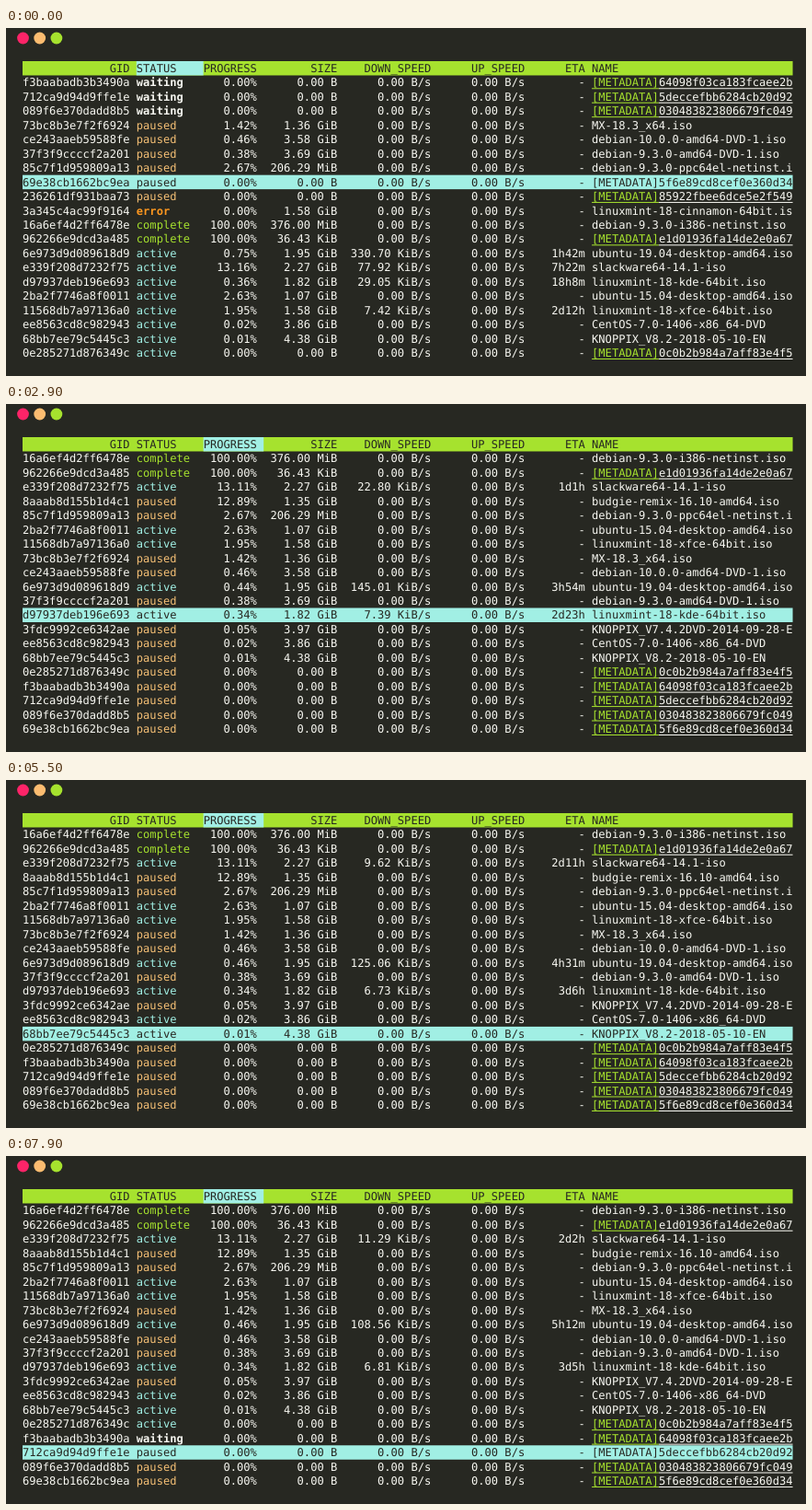
Animation of 870x378 px, one loop 8 s. Source, as an HTML page:

```html
<!DOCTYPE html>
<html lang="en">
<head>
<meta charset="utf-8">
<title>Download manager</title>
<style>
  html, body { margin: 0; width: 100%; height: 100%; overflow: hidden; background: #272822; }
  svg { display: block; width: 870px; height: 378px; }
  text { font: 12.1px "DejaVu Sans Mono", monospace; fill: #f8f8f2; text-rendering: geometricPrecision; }
  .dark { fill: #272822; }
  .green, .complete { fill: #a6e22e; }
  .aqua, .active { fill: #a1efe4; }
  .white { fill: #f8f8f2; }
  .paused { fill: #f4bf75; }
  .error { fill: #fd971f; font-weight: bold; }
  .waiting { font-weight: bold; }
</style>
</head>
<body>
<svg viewBox="0 0 870 378">
  <rect width="870" height="378" fill="#272822"/>
  <circle cx="18.5" cy="11" r="6.4" fill="#fd2468"/>
  <circle cx="36.7" cy="11" r="6.4" fill="#fcbc70"/>
  <circle cx="54.9" cy="11" r="6.4" fill="#a6e22e"/>
  <g id="screen"></g>
</svg>
<script>
const LEFT = 18, TOP = 36, CELL = 7.283, LINE = 15.46, COLS = 115, LOOP = 8000;

// gid | progress | size | name ("#" marks a metadata entry)
const items = Object.fromEntries(`
f3baabadb3b3490a|0.00|0.00 B|#64098f03ca183fcaee2b
712ca9d94d9ffe1e|0.00|0.00 B|#5deccefbb6284cb20d92
089f6e370dadd8b5|0.00|0.00 B|#030483823806679fc049
73bc8b3e7f2f6924|1.42|1.36 GiB|MX-18.3_x64.iso
ce243aaeb59588fe|0.46|3.58 GiB|debian-10.0.0-amd64-DVD-1.iso
37f3f9ccccf2a201|0.38|3.69 GiB|debian-9.3.0-amd64-DVD-1.iso
85c7f1d959809a13|2.67|206.29 MiB|debian-9.3.0-ppc64el-netinst.i
69e38cb1662bc9ea|0.00|0.00 B|#5f6e89cd8cef0e360d34
236261df931baa73|0.00|0.00 B|#85922fbee6dce5e2f549
3a345c4ac99f9164|0.00|1.58 GiB|linuxmint-18-cinnamon-64bit.is
16a6ef4d2ff6478e|100.00|376.00 MiB|debian-9.3.0-i386-netinst.iso
962266e9dcd3a485|100.00|36.43 KiB|#e1d01936fa14de2e0a67
6e973d9d089618d9|0.46|1.95 GiB|ubuntu-19.04-desktop-amd64.iso
e339f208d7232f75|13.11|2.27 GiB|slackware64-14.1-iso
d97937deb196e693|0.34|1.82 GiB|linuxmint-18-kde-64bit.iso
2ba2f7746a8f0011|2.63|1.07 GiB|ubuntu-15.04-desktop-amd64.iso
11568db7a97136a0|1.95|1.58 GiB|linuxmint-18-xfce-64bit.iso
ee8563cd8c982943|0.02|3.86 GiB|CentOS-7.0-1406-x86_64-DVD
68bb7ee79c5445c3|0.01|4.38 GiB|KNOPPIX_V8.2-2018-05-10-EN
0e285271d876349c|0.00|0.00 B|#0c0b2b984a7aff83e4f5
8aaab8d155b1d4c1|12.89|1.35 GiB|budgie-remix-16.10-amd64.iso
3fdc9992ce6342ae|0.05|3.97 GiB|KNOPPIX_V7.4.2DVD-2014-09-28-E
`.trim().split("\n").map(line => {
  const [gid, progress, size, name] = line.split("|");
  return [gid.slice(0, 4), { gid, progress, size, name }];
}));

const byStatus = "f3ba 712c 089f 73bc ce24 37f3 85c7 69e3 2362 3a34 16a6 9622 6e97 e339 d979 2ba2 1156 ee85 68bb 0e28";
const byProgress = "16a6 9622 e339 8aaa 85c7 2ba2 1156 73bc ce24 6e97 37f3 d979 3fdc ee85 68bb 0e28 f3ba 712c 089f 69e3";
const swapped = byProgress.replace("ce24 6e97", "6e97 ce24");
const complete = "16a6 9622", running = "6e97 e339 d979 2ba2 1156";

// live: "key speed eta [progress]", separated by commas
const snapshot = (order, live, status) => ({
  order: order.split(" "),
  status: { complete, ...status },
  live: Object.fromEntries(live.split(",").map(entry => {
    const [key, speed, eta, progress] = entry.split(" ");
    return [key, { speed, eta, ...(progress && { progress }) }];
  })),
});
const progressView = (live, started = "", order = byProgress, waiting = "") =>
  snapshot(order, live, { active: running + started, waiting });

const finished = snapshot(byStatus,
  "6e97 330.70 1h42m 0.75,e339 77.92 7h22m 13.16,d979 29.05 18h8m 0.36,1156 7.42 2d12h",
  { waiting: "f3ba 712c 089f", error: "3a34", active: running + " ee85 68bb 0e28" });
finished.sortByStatus = true;

const views = [
  progressView("e339 23.46 1d30m,6e97 123.77 4h34m 0.43,d979 8.39 2d14h"),
  progressView("e339 22.80 1d1h,6e97 145.01 3h54m 0.44,d979 7.39 2d23h"),
  progressView("e339 12.74 1d21h,6e97 136.12 4h9m 0.44,d979 6.47 3d9h"),
  progressView("e339 7.16 3d8h,6e97 127.04 4h27m 0.45,d979 5.67 3d21h", " ee85"),
  progressView("e339 9.62 2d11h,6e97 125.06 4h31m,d979 6.73 3d6h", " ee85 68bb"),
  progressView("e339 13.22 1d19h,6e97 115.89 4h53m,d979 7.98 2d18h", " ee85 68bb 0e28"),
  progressView("e339 11.29 2d2h,6e97 108.56 5h12m,d979 6.81 3d5h", " ee85 68bb 0e28", swapped, "f3ba"),
];

// start time, view, selected row, visible rows
const timeline = [
  [0, finished, 8, 20], [200, finished, 8, 19],
  [1100, views[0], 1], [2200, views[1], 1], [2400, views[1], 4], [2900, views[1], 12],
  [3200, views[1], 14], [3300, views[2], 14], [4400, views[3], 14], [4700, views[3], 15],
  [5500, views[4], 15], [5900, views[4], 16], [6500, views[5], 16], [6800, views[5], 17],
  [7500, views[6], 17], [7900, views[6], 18],
];

const colX = col => LEFT + col * CELL;
const rowY = row => TOP + row * LINE;
const bar = (row, from, to, cls) =>
  `<rect class="${cls}" x="${colX(from)}" y="${rowY(row)}" width="${(to - from) * CELL}" height="${LINE}"/>`;
const put = (row, col, str, cls = "") =>
  `<text class="${cls}" x="${colX(col)}" y="${rowY(row) + 11.9}">${str}</text>`;
const putRight = (row, end, str, cls) => put(row, end - str.length, str, cls);
const underlined = (row, col, str, cls) => put(row, col, str, cls) +
  `<rect class="${cls}" x="${colX(col)}" y="${rowY(row) + 13.8}" width="${str.length * CELL}" height="1"/>`;

function header(sortByStatus) {
  const [from, to] = sortByStatus ? [17, 27] : [27, 36];
  return bar(0, 0, COLS, "green") + bar(0, from, to, "aqua") +
    put(0, 17, "STATUS", "dark") + put(0, 85, "NAME", "dark") +
    [[16, "GID"], [35, "PROGRESS"], [47, "SIZE"], [61, "DOWN_SPEED"], [75, "UP_SPEED"], [84, "ETA"]]
      .map(([end, title]) => putRight(0, end, title, "dark")).join("");
}

function nameCell(row, name, selected) {
  const cls = selected ? "dark" : "";
  if (name[0] !== "#") return put(row, 85, name, cls);
  const tag = "[METADATA]", hash = name.slice(1);
  return selected ? put(row, 85, tag + hash, cls)
    : underlined(row, 85, tag, "green") + underlined(row, 95, hash, "white");
}

function itemRow(view, key, row, selected) {
  const item = { ...items[key], ...view.live[key] };
  const status = Object.keys(view.status).find(s => view.status[s].includes(key)) || "paused";
  const cls = selected ? "dark" : "";
  const cells = [
    [16, item.gid], [35, item.progress + "%"], [47, item.size],
    [61, item.speed ? item.speed + " KiB/s" : "0.00 B/s"], [75, "0.00 B/s"], [84, item.eta || "-"],
  ];
  return (selected ? bar(row, 0, COLS, "aqua") : "") +
    cells.map(([end, str]) => putRight(row, end, str, cls)).join("") +
    put(row, 17, status, cls || status) + nameCell(row, item.name, selected);
}

const screenGroup = document.getElementById("screen");
let shown;

function draw() {
  const time = performance.now() % LOOP;
  const step = timeline.findLast(([start]) => start <= time);
  if (step !== shown) {
    const [, view, selected, count = 20] = shown = step;
    screenGroup.innerHTML = header(view.sortByStatus) + view.order.slice(0, count)
      .map((key, i) => itemRow(view, key, i + 1, i + 1 === selected)).join("");
  }
  requestAnimationFrame(draw);
}
draw();
</script>
</body>
</html>
```
